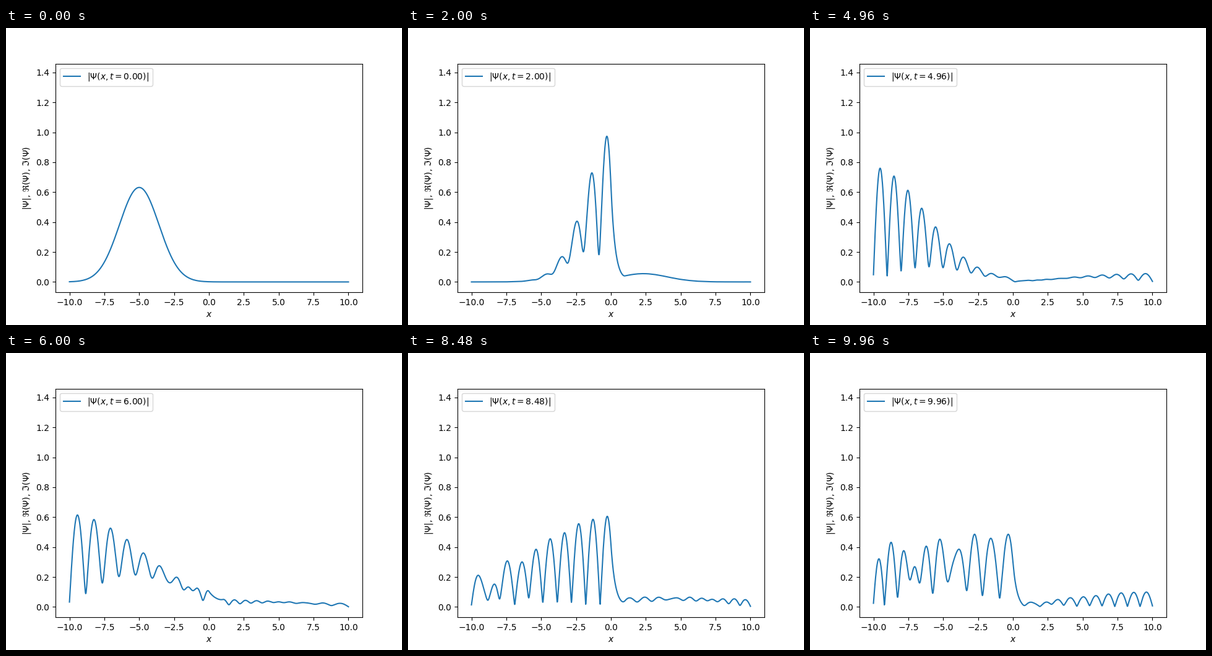
A matplotlib script that plays this animation: 640x480 px, repeating every 10000 ms.

```python
import numpy as np
import matplotlib.pyplot as plt
from matplotlib.animation import FuncAnimation

# Wave packet in a hard-walled box, hitting a rectangular barrier (hbar = m = 1)
FRAMES = 250
INTERVAL = 40
N = 1000
X0, K0, SIGMA = -5.0, 3.0, 1.0
BARRIER, WIDTH = 10.0, 1.0

x = np.linspace(-10, 10, N)
dx = x[1] - x[0]
times = np.arange(FRAMES) * INTERVAL / 1000


def hamiltonian():
    potential = np.where((x > 0) & (x < WIDTH), BARRIER, 0.0)
    hop = np.full(N - 1, -0.5 / dx**2)
    return np.diag(potential + 1 / dx**2) + np.diag(hop, 1) + np.diag(hop, -1)


def evolve():
    """Return |psi| with one row per time."""
    psi0 = np.exp(-((x - X0) / (2 * SIGMA))**2 + 1j * K0 * x)
    psi0 /= (2 * np.pi * SIGMA**2)**0.25
    energy, modes = np.linalg.eigh(hamiltonian())
    weights = modes.T @ psi0
    phases = np.exp(-1j * np.outer(times, energy))
    return np.abs((phases * weights) @ modes.T)


def label(t):
    return rf"$|\Psi(x, t={t:.2f})|$"


amplitude = evolve()

fig, ax = plt.subplots(figsize=(6.4, 4.8), dpi=100)
line, = ax.plot(x, amplitude[0], label=label(0))
top = 2.2 * amplitude[0].max()
ax.set_ylim(-0.05 * top, 1.05 * top)
ax.set_xlabel("$x$")
ax.set_ylabel(r"$|\Psi|$, $\Re(\Psi)$, $\Im(\Psi)$")
caption = ax.legend(loc="upper left").get_texts()[0]


def update(i):
    line.set_ydata(amplitude[i])
    caption.set_text(label(times[i]))
    return line, caption


anim = FuncAnimation(fig, update, frames=FRAMES, interval=INTERVAL, repeat=True)
plt.show()
```
